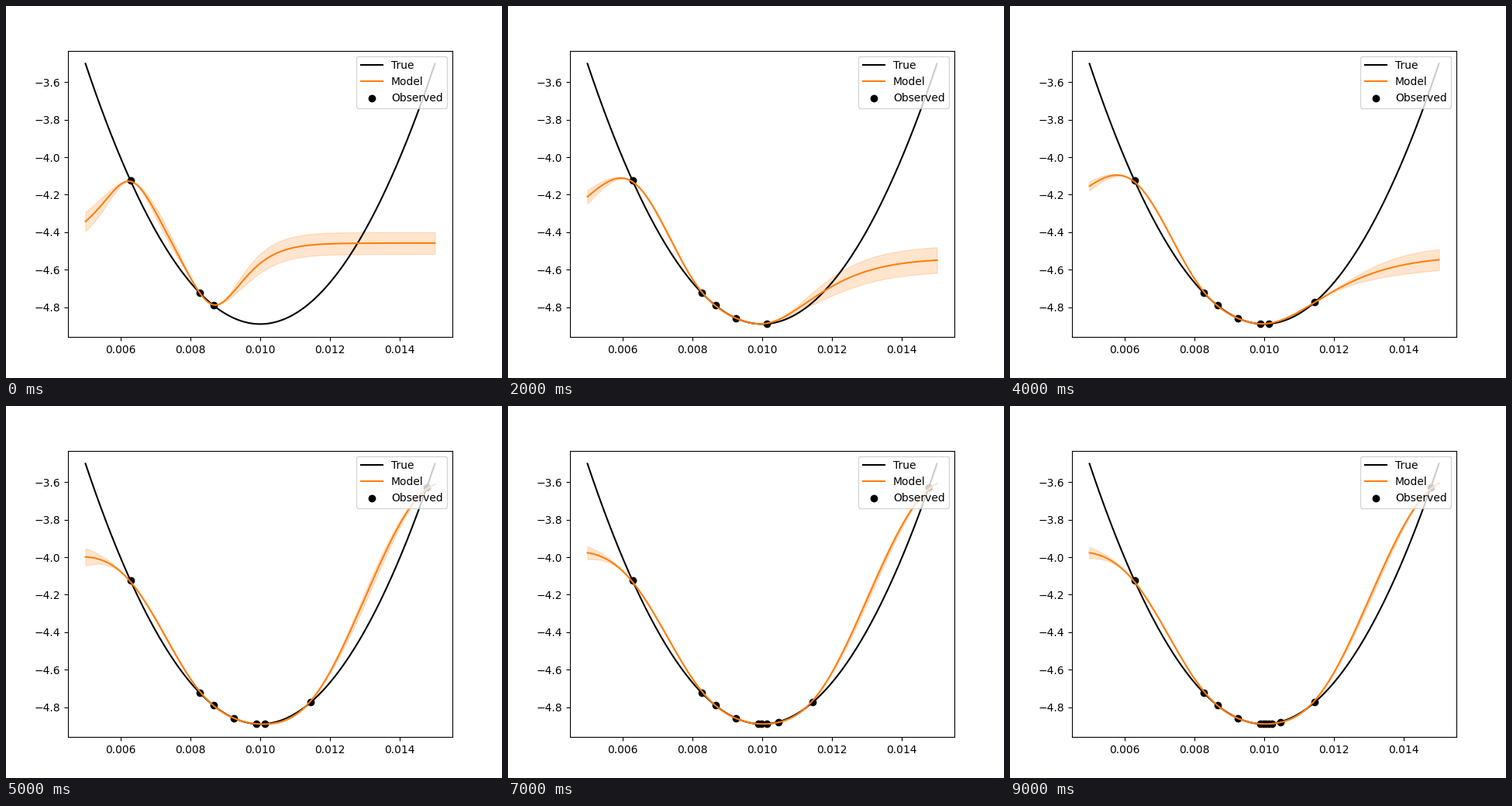
Recreate the animation shown at these times as a matplotlib script. Size 640 px wide and 480 px high, loop 10 s.

```python
import numpy as np
import matplotlib.pyplot as plt
from matplotlib.animation import FuncAnimation

STEPS = 10
START = 3
NOISE = 0.01
LOW = -4.8905
SPAN = 1.39

# Sample positions in thousandths, in the order they are observed
SAMPLES = np.array([6.290, 8.270, 8.664, 9.246, 10.133, 11.442,
                    9.889, 14.767, 10.455, 9.978, 10.222, 10.055])


def truth(x):
    return LOW + SPAN * ((x - 10) / 5) ** 2


def length_scale(step):
    """The kernel widens as samples arrive, then settles."""
    return np.interp(step, [0, 1, 2, 4, 5, 7], [0.94, 1.37, 1.70, 1.98, 2.42, 2.62])


def matern(a, b, scale):
    s = np.sqrt(5) * np.abs(a[:, None] - b[None, :]) / scale
    return (1 + s + s ** 2 / 3) * np.exp(-s)


def posterior(x, xs, scale):
    """Gaussian process with a constant mean: posterior mean and variance."""
    n = len(xs)
    ys = truth(xs)
    inv = np.linalg.inv(matern(xs, xs, scale) + NOISE * np.eye(n))
    cross = matern(x, xs, scale)
    mu = inv.sum(axis=0) @ ys / inv.sum()
    rest = ys - mu
    signal = rest @ inv @ rest / (0.8 * (n + 2))
    explained = np.sum(cross @ inv * cross, axis=1)
    return mu + cross @ inv @ rest, signal * (1 - explained)


grid = np.linspace(5, 15, 201)
fig, ax = plt.subplots(figsize=(6.4, 4.8), dpi=100)
ax.plot(grid / 1000, truth(grid), color="black", label="True")
model, = ax.plot([], [], color="tab:orange", label="Model")
dots = ax.scatter([], [], color="black", label="Observed")
ax.set_xlim(0.0045, 0.0155)
ax.set_ylim(LOW - 0.05 * SPAN, LOW + 1.05 * SPAN)
ax.legend(loc="upper right")
bands = []


def draw(step):
    xs = SAMPLES[:START + step]
    mean, var = posterior(grid, xs, length_scale(step))
    while bands:
        bands.pop().remove()
    bands.append(ax.fill_between(grid / 1000, mean - var, mean + var,
                                 color="tab:orange", alpha=0.2, zorder=0.9))
    model.set_data(grid / 1000, mean)
    dots.set_offsets(np.column_stack([xs / 1000, truth(xs)]))
    return [model, dots] + bands


anim = FuncAnimation(fig, draw, frames=STEPS, interval=1000,
                     init_func=lambda: draw(0), repeat=True, repeat_delay=0)
plt.show()
```
